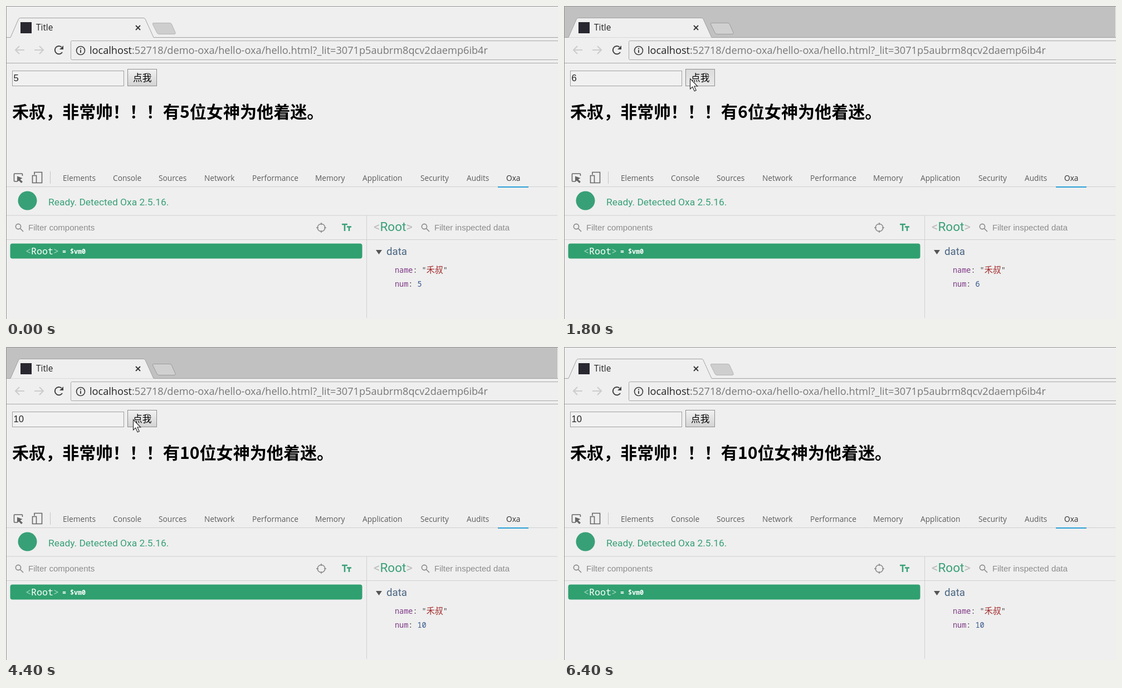
Recreate the animation shown at these times as an HTML page. Size 991 by 562 pixels, loop 6.6 s.

```html
<!DOCTYPE html>
<html lang="zh-CN">
<head>
<meta charset="utf-8">
<title>Title</title>
<style>
  html, body { margin: 0; width: 100%; height: 100%; overflow: hidden; background: #efefef; }
  svg { display: block; }
  text { white-space: pre; }
  .ui { font-family: "Open Sans", "Noto Sans", sans-serif; }
  .cjk { font-family: "Noto Sans CJK SC", "Noto Sans CJK", sans-serif; }
  .form { font-family: "Liberation Sans", sans-serif; }
  .panel { font-family: Roboto, sans-serif; }
  .mono { font-family: "Noto Sans Mono", "Noto Sans CJK SC", monospace; font-size: 13.5px; }
  .line { fill: none; stroke: #d0d0d0; }
  .icon { fill: none; stroke: #666; stroke-width: 1.6; }
  .hint { fill: #8c8c8c; font-size: 15px; }
  .key { fill: #7d3886; }
  .green { fill: #38a077; }
</style>
</head>
<body>
<svg width="991" height="562" viewBox="0 0 991 562">
  <defs>
    <linearGradient id="up" x2="0" y2="1"><stop stop-color="#f2f2f2"/><stop offset="1" stop-color="#d3d3d3"/></linearGradient>
    <linearGradient id="down" x2="0" y2="1"><stop stop-color="#dcdcdc"/><stop offset="1" stop-color="#e9e9e9"/></linearGradient>
    <g id="lens" class="icon" style="stroke:#888"><circle cx="5" cy="5" r="4.6"/><path d="M8.5 8.5 14 14"/></g>
  </defs>
  <rect width="991" height="562" fill="#efefef"/>

  <!-- Tab strip -->
  <rect id="strip" x="1" y="1" width="989" height="56"/>
  <path d="M0 56.500H8L22.500 23.500Q23.500 21.500 25.500 21.500H247Q249 21.500 250 23.500L265 56.500H991" fill="#efefef" stroke="#a0a0a0"/>
  <path id="plus" d="M265 30.500H294Q296.500 30.500 297.500 33L304 47.500Q305 50.500 302 50.500H275Q272 50.500 271 48L263.500 33Q262.500 30.500 265 30.500Z"/>
  <rect x="26" y="29" width="20" height="20" fill="#29272f"/>
  <text class="ui" x="54" y="44" font-size="15.400" fill="#222">Title</text>
  <path d="M233 35l8 8m0-8-8 8" stroke="#333" stroke-width="1.800"/>

  <!-- Toolbar -->
  <g fill="none" stroke-width="2">
    <path d="M33 79H17m7-7-7 7 7 7M51 79H67m-7-7 7 7-7 7" stroke="#ccc"/>
    <path d="M101 83A7.200 7.200 0 1 1 99.500 73.500" stroke="#444"/>
    <path d="M103 71V78H96Z" fill="#444" stroke="none"/>
    <circle cx="134" cy="80" r="7.500" stroke="#444" stroke-width="1.700"/>
    <path d="M134 79V84M134 75.500V77.500" stroke="#444"/>
  </g>
  <path d="M991 62.500H118.500Q116.500 62.500 116.500 64.500V94.500Q116.500 96.500 118.500 96.500H991M0 102.500H991" fill="none" stroke="#a8a8a8"/>
  <text class="ui" x="150" y="86" font-size="18.150" fill="#777"><tspan fill="#222">localhost</tspan>:52718/demo-oxa/hello-oxa/hello.html?_lit=3071p5aubrm8qcv2daemp6ib4r</text>

  <!-- Page -->
  <rect x="11.500" y="116.500" width="200" height="27" fill="#f1f1f1" stroke="#a0a0a0"/>
  <text class="form num" x="13.500" y="135" font-size="16.670" fill="#222"></text>
  <rect id="button" x="218.500" y="113.500" width="52" height="30" stroke="#8e8e8e"/>
  <text class="cjk" x="228" y="135" font-size="16.670">点我</text>
  <text class="cjk" x="11" y="201" font-size="30.100" font-weight="700">禾叔，非常帅！！！有<tspan class="num"></tspan>位女神为他着迷。</text>

  <!-- Inspector tabs -->
  <g class="icon">
    <path d="M20 315H15.500Q14.500 315 14.500 314V302Q14.500 301 15.500 301H28.500Q29.500 301 29.500 302V305"/>
    <path d="M20 305.500V316L23 313.500 27.500 318 30 315.500 25.500 311.500 29.500 309Z" fill="#666" stroke="none"/>
    <path d="M51 303V298.500H64.500V317.500H55M47.500 304.500H54.500V317.500H47.500Z"/>
    <path d="M79.500 297V319" stroke="#c4c4c4" stroke-width="1"/>
  </g>
  <g id="tabs" class="ui" font-size="13.700" fill="#5c5c5c"></g>
  <path class="line" d="M1 324.500H990M1 376H990M1 419.500H990M647.500 376V560"/>
  <rect x="883" y="324" width="55" height="2" fill="#2a9fd8"/>

  <!-- Component panel -->
  <circle class="green" cx="38.500" cy="349.500" r="17"/>
  <text class="panel green" x="76" y="358" font-size="17.400">Ready. Detected Oxa 2.5.16.</text>
  <use href="#lens" x="17" y="391"/>
  <text class="form hint" x="40" y="403">Filter components</text>
  <g class="icon" style="stroke:#8c8c8c"><circle cx="566" cy="398" r="6.800"/><path d="M566 389v4m0 10v4M557 398h4m10 0h4"/></g>
  <path d="M603 392H613M608 392V404M612 396.500H620M616 396.500V404" stroke="#38a077" stroke-width="2.500"/>
  <rect x="7.500" y="426.500" width="632" height="27" rx="4" fill="#30a070"/>
  <text class="mono" x="35" y="446" style="font-size:16.670px" font-weight="500" fill="#fff"><tspan fill="#a9dac4">&lt;</tspan>Root<tspan fill="#a9dac4">&gt;</tspan></text>
  <text class="mono" x="101" y="445" style="font-size:11.700px" font-weight="600" fill="#fff">= $vm0</text>

  <!-- Data panel -->
  <text class="panel" x="660" y="404" font-size="22.500" fill="#bbb">&lt;<tspan class="green">Root</tspan>&gt;</text>
  <use href="#lens" x="746" y="391"/>
  <text class="form hint" x="769" y="403">Filter inspected data</text>
  <path d="M664 438H675L669.500 446Z" fill="#555"/>
  <text class="panel" x="683" y="447" font-size="18.700" fill="#486480">data</text>
  <text class="mono" x="698" y="479" fill="#444"><tspan class="key">name</tspan>: "<tspan fill="#a32a2a" font-size="15">禾叔</tspan>"</text>
  <text class="mono" x="698" y="504" fill="#444"><tspan class="key">num</tspan>: <tspan class="num" fill="#34558b"></tspan></text>

  <path d="M.5 562V.5H991" fill="none" stroke="#939393"/>
  <path id="cursor" d="M.5.500V19L4.700 15.200 8.200 22.800 11.200 21.400 7.800 14H13.700Z" fill="#fff" stroke="#222" stroke-width="1.100"/>
</svg>
<script>
const $ = id => document.getElementById(id);
const LOOP = 6600;
const HIDDEN = [-50, -50];

// [start, value] steps
const pointer = [[0, HIDDEN], [200, [189, 113]], [400, [301, 174]], [600, [240, 138]],
  [800, [226, 130]], [2000, [228, 130]], [5600, [128, 7]], [5800, [118, -8]], [6000, HIDDEN]];
const count = [[0, 5], [1200, 6], [2000, 7], [2800, 8], [3800, 9], [4400, 10]];
const presses = [[1000, 1200], [1800, 2000], [2600, 2800], [3600, 3800]];

const at = (steps, t) => steps.findLast(([start]) => start <= t)[1];

const tabs = { Elements: 102, Console: 192, Sources: 274, Network: 356, Performance: 442,
  Memory: 555, Application: 640, Security: 744, Audits: 827, Oxa: 898 };
$('tabs').innerHTML = Object.entries(tabs).map(([name, x]) =>
  `<text x="${x}" y="314"${name === 'Oxa' ? ' fill="#333"' : ''}>${name}</text>`).join('');

const nums = document.querySelectorAll('.num');

function draw(now) {
  const t = now % LOOP;
  const focused = t >= 1000 && t < 6400;
  const pressed = presses.some(([a, b]) => t >= a && t < b);
  const n = String(at(count, t));
  nums.forEach(el => { if (el.textContent !== n) el.textContent = n; });
  $('strip').setAttribute('fill', focused ? '#c1c1c1' : '#efefef');
  $('plus').setAttribute('fill', focused ? '#d0d0d0' : '#cecece');
  $('plus').setAttribute('stroke', focused ? '#9c9c9c' : '#b4b4b4');
  $('button').setAttribute('fill', pressed ? 'url(#down)' : 'url(#up)');
  $('cursor').setAttribute('transform', `translate(${at(pointer, t)})`);
}

function tick() {
  draw(performance.now());
  requestAnimationFrame(tick);
}
tick();
</script>
</body>
</html>
```
